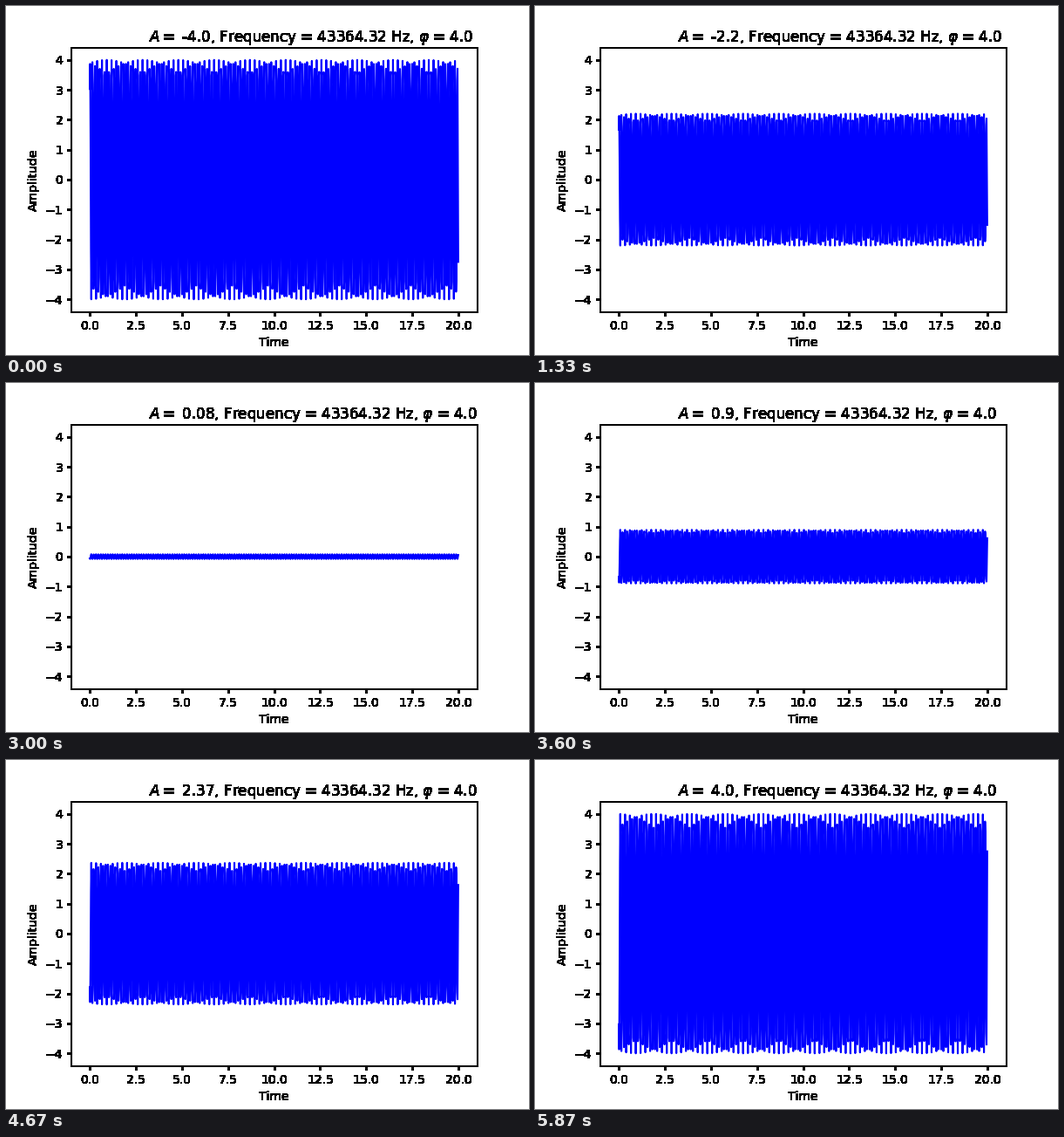
These frames come from a looping animation (600x400 px, 6.01 s). A matplotlib script:

```python
import numpy as np
import matplotlib.pyplot as plt
from matplotlib.animation import FuncAnimation
from matplotlib.patches import Rectangle

plt.rcParams["text.kerning_factor"] = 6

TICKS, LOOP_MS, STEPS = 200, 6010, 50
TICK_MS = LOOP_MS / TICKS
FREQ, PHASE = 43364.3242, 4.0

t = np.linspace(0, 20, 1000)
carrier = np.sin(2 * np.pi * FREQ * t + PHASE)
amps = np.linspace(-4, 4, STEPS)
# One step every 120 ms, snapped to a 30 Hz clock
starts = np.round(3.6 * np.arange(STEPS)) * 1000 / 30


def harden(img, dpi):
    """Turn every touched pixel solid black, for crisp heavy labels."""
    out = np.zeros_like(img)
    out[..., 3] = img[..., 3] > 0
    return out, 0, 0


fig, ax = plt.subplots(figsize=(6, 4), dpi=100, facecolor="white")
fig.subplots_adjust(left=0.125, right=0.9, bottom=0.125, top=0.88)
ax.set(xlim=(-1, 21), ylim=(-4.4, 4.4), xlabel="Time", ylabel="Amplitude")
ax.set_xticks(np.arange(0, 20.1, 2.5))
ax.set_yticks(range(-4, 5))

# Outer edge of the frame, one pixel outside the spines
fig.add_artist(Rectangle((74, 48), 468, 305, transform=None, fc="black",
                         lw=0, zorder=-1))

line, = ax.plot(t, amps[0] * carrier, color="blue", lw=1.5)
title = ax.text(3.2, 4.6, "", fontsize=12)
for artist in (ax.xaxis, ax.yaxis, title):
    artist.set_agg_filter(harden)


def update(i):
    step = np.searchsorted(starts, (i + 1) * TICK_MS, side="right") - 1
    amp = float(amps[step])
    line.set_ydata(amp * carrier)
    title.set_text(f"$A = $ {round(amp, 2)}, "
                   f"Frequency = {FREQ:.2f} Hz, $\\varphi$ = {PHASE}")
    return line, title


anim = FuncAnimation(fig, update, frames=TICKS, interval=TICK_MS,
                     repeat=True, repeat_delay=0, blit=False)
plt.show()
```
